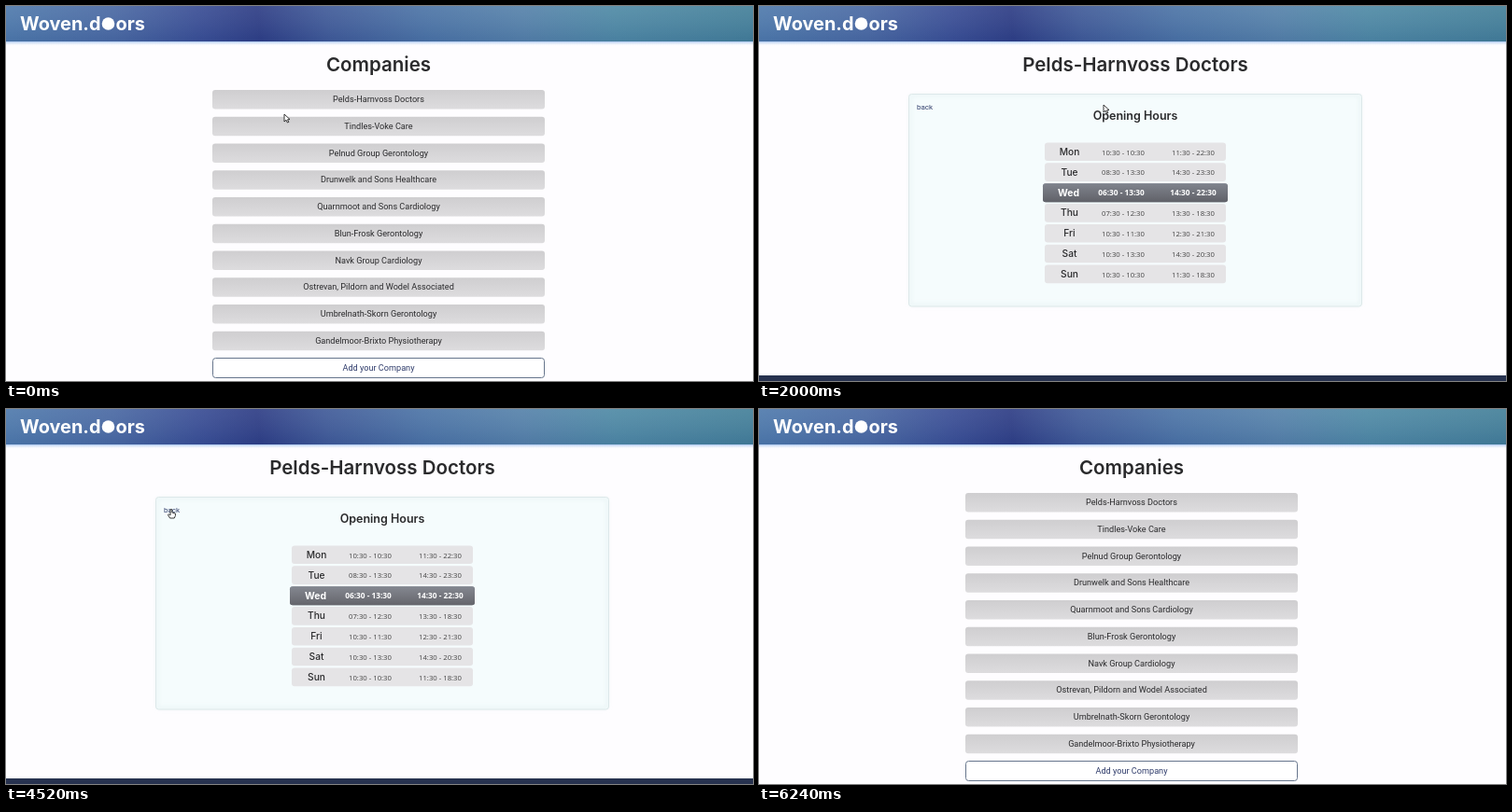
Write an HTML page that moves like this. It is 800 px wide and 402 px high and loops after 6760 ms.

```html
<!DOCTYPE html>
<html lang="en">
<head>
<meta charset="utf-8">
<title>Opening hours</title>
<style>
html, body { margin: 0; width: 100%; height: 100%; overflow: hidden; background: #fefdff; }
svg { display: block; width: 800px; height: 402px; }
text { text-anchor: middle; fill: #2a2a2c; }
.row { font: 9.13px Roboto, sans-serif; }
.on { font-weight: 500; fill: #fff; }
.add { fill: #2f3c6b; }
.title { font: 600 20.5px Inter, sans-serif; }
.sub { font: 600 12.5px Inter, sans-serif; }
.day { font: 500 10.2px Inter, sans-serif; }
.time { font: 7.73px "Open Sans", "Noto Sans", sans-serif; fill: #444; }
.today .day { font-weight: 700; font-size: 10.4px; fill: #fff; }
.today .time { font-weight: 700; font-size: 8.3px; fill: #fff; }
.back { font: 8px Roboto, sans-serif; fill: #35426f; text-anchor: start; }
.logo { font: 700 19.9px Inter, sans-serif; fill: #fff; text-anchor: start; }
</style>
</head>
<body>
<svg viewBox="0 0 800 402">
  <defs>
    <linearGradient id="sky" gradientUnits="userSpaceOnUse" x1="0" y1="0" x2="800" y2="-100">
      <stop offset="0" stop-color="#4f7aac"/>
      <stop offset=".14" stop-color="#4a69a3"/>
      <stop offset=".25" stop-color="#3a4e95"/>
      <stop offset=".33" stop-color="#2e3d85"/>
      <stop offset=".42" stop-color="#405a98"/>
      <stop offset=".55" stop-color="#4c74a6"/>
      <stop offset=".68" stop-color="#5682aa"/>
      <stop offset=".8" stop-color="#4f8aa5"/>
      <stop offset="1" stop-color="#437f98"/>
    </linearGradient>
    <linearGradient id="shade" x2="0" y2="1">
      <stop stop-color="#fff" stop-opacity=".08"/>
      <stop offset="1" stop-color="#123070" stop-opacity=".12"/>
    </linearGradient>
    <linearGradient id="glow" x2="0" y2="1">
      <stop stop-color="#a9c6ee"/>
      <stop offset="1" stop-color="#fefdff" stop-opacity="0"/>
    </linearGradient>
    <linearGradient id="plain" x2="0" y2="1">
      <stop stop-color="#cfced0"/><stop offset="1" stop-color="#dddcde"/>
    </linearGradient>
    <linearGradient id="hover" x2="0" y2="1">
      <stop stop-color="#7d8199"/><stop offset="1" stop-color="#a09da6"/>
    </linearGradient>
    <linearGradient id="dark" x2="0" y2="1">
      <stop stop-color="#465064"/><stop offset="1" stop-color="#262c3a"/>
    </linearGradient>
    <linearGradient id="grey" x2="0" y2="1">
      <stop stop-color="#a3a3a6"/><stop offset="1" stop-color="#838184"/>
    </linearGradient>
    <filter id="lift" x="-10%" y="-100%" width="120%" height="400%">
      <feDropShadow dx="0" dy="4" stdDeviation="5" flood-color="#445" flood-opacity=".2"/>
    </filter>
    <filter id="soft"><feGaussianBlur stdDeviation="2"/></filter>
  </defs>
  <g id="page"></g>
  <rect y="38" width="800" height="5" fill="url(#glow)"/>
  <rect width="800" height="38" fill="url(#sky)"/>
  <rect width="800" height="38" fill="url(#shade)"/>
  <text class="logo" x="15" y="25.5">Woven.d</text>
  <circle cx="109.5" cy="19" r="6.8" fill="#fff"/>
  <text class="logo" x="117.5" y="25.5">ors</text>
  <path id="cursor" stroke-linejoin="round"/>
</svg>
<script>
const LOOP = 6760, STEPS = 26;
const companies = [
  'Pelds-Harnvoss Doctors', 'Tindles-Voke Care', 'Pelnud Group Gerontology',
  'Drunwelk and Sons Healthcare', 'Quarnmoot and Sons Cardiology',
  'Blun-Frosk Gerontology', 'Navk Group Cardiology',
  'Ostrevan, Pildorn and Wodel Associated',
  'Umbrelnath-Skorn Gerontology', 'Gandelmoor-Brixto Physiotherapy'
];
const week = [
  'Mon 10:30-10:30 11:30-22:30', 'Tue 08:30-13:30 14:30-23:30',
  'Wed 06:30-13:30 14:30-22:30', 'Thu 07:30-12:30 13:30-18:30',
  'Fri 10:30-11:30 12:30-21:30', 'Sat 10:30-13:30 14:30-20:30',
  'Sun 10:30-10:30 11:30-18:30'
].map(line => line.replace(/-/g, ' - ').match(/[A-Z]\w+|\d\S+ - \S+/g));

// pointer path: step, x, y
const path = [
  [0, 298, 116], [1, 312, 352], [2, 329, 212], [5, 364, 124], [6, 368, 97],
  [8, 369, 106], [10, 369, 106], [15, 371, 207], [17, 219, 122], [18, 177, 107],
  [19, 177, 107], [21, 300, 326], [22, 150, 230], [23, 70, 120], [24, 4, 12], [25, 4, 12]
];
const shapes = {
  arrow: 'M0 0V8L2 6.2L3.4 9L4.8 8.4L3.5 5.8L6 5.5Z',
  hand: 'M-.9 1Q0 -.6 .9 1V4L4.4 5V7.5L3.2 10H-1.4L-3.6 6.4Q-3.3 5.2 -.9 6.6Z',
  beam: 'M-2 -3H2M0 -3V4M-2 4H2'
};
const page = document.getElementById('page'), cursor = document.getElementById('cursor');

const startOf = step => Math.round(step * 6.25) * 40;
const text = (cls, x, y, s) => `<text class="${cls}" x="${x}" y="${y}">${s}</text>`;
const box = (x, y, w, h, fill, extra = '') =>
  `<rect x="${x}" y="${y}" width="${w}" height="${h}" rx="3" fill="${fill}" ${extra}/>`;
const rowTop = i => 90 + 28.75 * i;

function pointer(step) {
  const i = Math.max(1, path.findIndex(p => p[0] >= step));
  const [a, x, y] = path[i - 1], [b, u, v] = path[i], f = (step - a) / (b - a);
  return [x + (u - x) * f, y + (v - y) * f];
}

function listPage(active) {
  const rows = companies.map((name, i) => {
    const y = rowTop(i), on = i === active;
    return (on ? box(220.5, y - .2, 357, 20.8, 'url(#hover)', 'filter="url(#lift)"')
               : box(221, y, 356, 20.5, 'url(#plain)')) +
      text(on ? 'row on' : 'row', 399, y + 13, name);
  });
  return text('title', 399, 69.5, 'Companies') + rows.join('') +
    box(221.5, 377.5, 355, 21, '#fff', 'stroke="#66758c"') +
    text('row add', 399, 390.7, 'Add your Company');
}

function hoursPage(time) {
  const pulse = .5 + .5 * Math.cos((time - 2520) / 2480 * 2 * Math.PI);
  const rows = week.map(([day, am, pm], i) => {
    const y = 146.5 + 21.85 * i, today = i === 2;
    const back = today
      ? box(304, y, 198, 20, 'url(#dark)') +
        box(304, y, 198, 20, 'url(#grey)', `opacity="${pulse}"`)
      : box(306, y, 194, 19.6, '#e5e4e6');
    return `<g class="${today ? 'today' : ''}">` + back +
      text('day', today ? 331.5 : 332.5, y + 13.4, day) +
      text('time', today ? 388 : 390, y + 13.1, am) +
      text('time', 465, y + 13.1, pm) + '</g>';
  });
  return text('title', 403, 69.5, companies[0]) +
    box(160.5, 94.5, 485, 227.5, '#f5fcfd', 'stroke="#d9e5e6"') +
    box(162, 96, 482, 224.5, 'none', 'stroke="#e6f1f2" stroke-width="2" filter="url(#soft)"') +
    text('back', 169, 111, 'back') + text('sub', 403, 122, 'Opening Hours') +
    rows.join('') + '<rect y="396" width="800" height="6" fill="#27324f"/>';
}

function draw(step) {
  const [x, y] = pointer(step), onList = step < 8 || step > 18;
  const active = onList && x > 221 && x < 577
    ? companies.findIndex((_, i) => y >= rowTop(i) && y <= rowTop(i) + 20.5) : -1;
  page.innerHTML = onList ? listPage(active) : hoursPage(startOf(step));

  const overText = !onList && y > 188 && y < 210;
  const kind = active >= 0 || step === 18 ? 'hand' : overText ? 'beam' : 'arrow';
  const style = {
    d: shapes[kind], transform: `translate(${x} ${y})`,
    fill: kind === 'beam' ? 'none' : '#fff', stroke: '#222', 'stroke-width': .9,
    visibility: step === STEPS - 1 ? 'hidden' : 'visible'
  };
  for (const key in style) cursor.setAttribute(key, style[key]);
}

let shown = -1;
function tick() {
  const time = performance.now() % LOOP;
  let step = STEPS - 1;
  while (startOf(step) > time) step--;
  if (step !== shown) draw(shown = step);
  requestAnimationFrame(tick);
}
tick();
</script>
</body>
</html>
```
